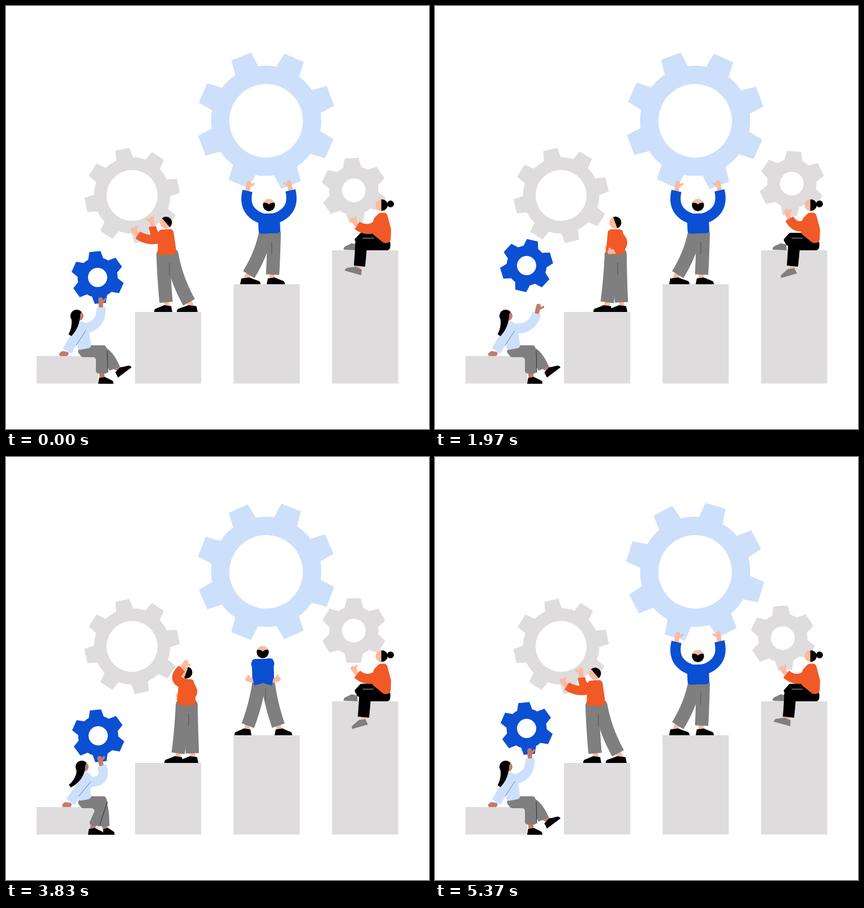
An HTML page with a canvas for the animation above (5.41 s loop, 748 by 748 pixels).

```html
<!DOCTYPE html>
<html lang="en">
<head>
<meta charset="utf-8">
<title>Gears</title>
<style>
html, body { margin: 0; width: 100%; height: 100%; overflow: hidden; background: #fff; }
canvas { display: block; }
</style>
</head>
<body>
<canvas id="stage" width="748" height="748"></canvas>
<script>
const g = document.getElementById('stage').getContext('2d');
const LOOP = 5410, TIMES = [0, 1200, 1970, 2670, 3830, 4670, 5370, LOOP];
const ORANGE = '#f15a26', BLUE = '#0b4fd3', PALE = '#cce0fc', STONE = '#dedcdc',
  GREY = '#7f7f7f', BLACK = '#000', SKIN = '#fbba9e', TAN = '#c27c6b';

// Poses of the two standing figures; feet are heel and signed length, twice.
const PUSHER = {
  push: { hip: [285, 440], chest: [283, 404], hand: [233, 405], back: [259, 390], feet: [294, -32, 339, -37], turn: -40, knee: 0 },
  stoop: { hip: [308, 440], chest: [301, 404], hand: [296, 455], back: [308, 440], feet: [313, -33, 340, -33], turn: -65, knee: 0 },
  proud: { hip: [319, 439], chest: [319, 404], hand: [318, 434], back: [314, 430], feet: [313, -33, 340, -33], turn: -20, knee: 0 },
  step: { hip: [303, 453], chest: [305, 415], hand: [274, 441], back: [325, 454], feet: [283, -32, 339, -37], turn: -5, knee: -34 },
  scratch: { hip: [319, 439], chest: [319, 402], hand: [311, 374], back: [314, 425], feet: [313, -33, 340, -33], turn: 20, knee: 0 }
};
const LIFTER = {
  hold: { hip: [466, 402], chest: [465, 376], head: [465, 352], hands: [427, 327, 503, 326], feet: [414, 36, 461, 32] },
  shift: { hip: [459, 404], chest: [458, 378], head: [460, 354], hands: [417, 335, 480, 325], feet: [414, 36, 461, 32] },
  lean: { hip: [478, 400], chest: [486, 372], head: [497, 353], hands: [511, 323, 543, 347], feet: [415, 21, 475, 31] },
  rest: { hip: [455, 395], chest: [454, 366], head: [454, 345], hands: [437, 395, 472, 395], feet: [434, -30, 475, 31] }
};
const TOSSER = {
  sit: { lean: 0, near: [169, 650], far: [192, 641], heel: 163, foot: [198, 657, 222, 639] },
  crouch: { lean: 9, near: [155, 652], far: [173, 653], heel: 145, foot: [171, 668, 192, 668] },
  perch: { lean: 5, near: [172, 650], far: [175, 649], heel: 163, foot: [173, 666, 201, 664] }
};
const cast = (poses, names) => names.split(' ').map(n => poses[n]);
const pusherKeys = cast(PUSHER, 'push stoop proud step scratch push push push');
const lifterKeys = cast(LIFTER, 'hold shift hold lean rest rest hold hold');
const tosserKeys = cast(TOSSER, 'sit sit sit sit crouch perch sit sit');

const bigTurn = [-21.3, 169.8, 294.3, 398.4, 606.1, 752.6, 872, 878.7];
const blueX = [162, 162, 162, 162, 163, 176, 162, 162];
const blueY = [480, 458, 459, 466, 493, 488, 480, 480];
const rightX = [615, 615, 631, 615, 615, 615, 615, 615];
const rightY = [326, 305, 314, 330, 307, 323, 320, 326];
const rightTurn = [-4, 5.5, 4, -3, 0, -4, -4, -4];
const legSwing = [0, .2, 1, 1, 1, 1, 0, 0];

let key = 0, part = 0;
const smooth = u => u * u * (3 - 2 * u);
function mix(a, b, u) {
  if (typeof a === 'number') return a + (b - a) * u;
  if (Array.isArray(a)) return a.map((v, i) => mix(v, b[i], u));
  return Object.fromEntries(Object.keys(a).map(k => [k, mix(a[k], b[k], u)]));
}
const linear = keys => mix(keys[key], keys[key + 1], part);
const eased = keys => mix(keys[key], keys[key + 1], smooth(part));

function disc(color, x, y, r, from = 0, to = 7) {
  g.fillStyle = color;
  g.beginPath();
  g.arc(x, y, r, from, to);
  g.fill();
}
function line(color, width, x1, y1, x2, y2) {
  g.strokeStyle = color;
  g.lineWidth = width;
  g.lineCap = 'round';
  g.beginPath();
  g.moveTo(x1, y1);
  g.lineTo(x2, y2);
  g.stroke();
}
function poly(color, p, r = 0) {
  const n = p.length;
  g.fillStyle = color;
  g.beginPath();
  g.moveTo((p[0] + p[n - 2]) / 2, (p[1] + p[n - 1]) / 2);
  for (let i = 0; i < n; i += 2) g.arcTo(p[i], p[i + 1], p[(i + 2) % n], p[(i + 3) % n], r);
  g.closePath();
  g.fill();
}
// Tapered limb from a to b, pulled towards c.
function tube(color, [ax, ay], [cx, cy], [bx, by], w, end = w) {
  const left = [], right = [];
  for (let i = 0; i <= 16; i++) {
    const t = i / 16, s = 1 - t;
    const x = s * s * ax + 2 * s * t * cx + t * t * bx;
    const y = s * s * ay + 2 * s * t * cy + t * t * by;
    const dx = s * (cx - ax) + t * (bx - cx), dy = s * (cy - ay) + t * (by - cy);
    const k = mix(w, end, t) / 2 / (Math.hypot(dx, dy) || 1);
    left.push([x - dy * k, y + dx * k]);
    right.unshift([x + dy * k, y - dx * k]);
  }
  disc(color, ax, ay, w / 2);
  g.beginPath();
  left.concat(right).forEach(q => g.lineTo(...q));
  g.fill();
}
// Elbow of an arm with two equal bones.
function elbow([ax, ay], [bx, by], bone, side) {
  const dx = bx - ax, dy = by - ay, d = Math.hypot(dx, dy);
  const k = side * Math.sqrt(Math.max(0, bone * bone - d * d / 4)) / d;
  return [(ax + bx) / 2 - dy * k, (ay + by) / 2 + dx * k];
}
function hand(color, [ex, ey], [x, y], thumb) {
  const d = Math.hypot(x - ex, y - ey), dx = (x - ex) / d * 10, dy = (y - ey) / d * 10 - 4;
  line(color, 8, x, y, x + dx, y + dy);
  line(color, 4, x + dx * .5, y + dy * .5, x + dx - dy * .6 * thumb, y + dy + dx * .6 * thumb);
}
function makeArm(from, to, bone, side) {
  const mid = elbow(from, to, bone, side);
  return {
    sleeve: (color, w, end) => tube(color, from, mid, to, w, end),
    hand: (color, thumb) => hand(color, mid, to, thumb)
  };
}
function shoe(color, [hx, hy, tx, ty], h = 12) {
  const dx = tx - hx, dy = ty - hy, k = h * (Math.sign(dx) || 1) / Math.hypot(dx, dy);
  const spot = (a, b) => [hx + dx * a + dy * k * b, hy + dy * a - dx * k * b];
  g.fillStyle = color;
  g.beginPath();
  g.moveTo(hx, hy);
  g.lineTo(...spot(.06, .85));
  g.lineTo(...spot(.45, 1));
  g.quadraticCurveTo(...spot(.65, .75), ...spot(.9, .5));
  g.quadraticCurveTo(...spot(1, .4), tx, ty);
  g.fill();
}
function ankle(color, [x, y], [hx, hy, tx, ty]) {
  line(color, 9, x, y - 3, mix(hx, tx, .27), mix(hy, ty, .27) - 8);
}

function gear(color, teeth, x, y, turn, outer, body, hole) {
  const [top, base] = teeth === 8 ? [.153, .225] : [.215, .385];
  const sin = body * Math.sin(base), cos = body * Math.cos(base);
  disc(color, x, y, body);
  for (let i = 0; i < teeth; i++) {
    g.save();
    g.translate(x, y);
    g.rotate(turn * Math.PI / 180 + i * 2 * Math.PI / teeth);
    poly(color, [-top * outer, -outer, top * outer, -outer, sin, -cos, 0, 0, -sin, -cos]);
    g.restore();
  }
  disc('#fff', x, y, hole);
}

// Trousers hang from the hip; each hem sits over its foot, drawn a little to the hip.
function legs({ hip: [x, y], feet, knee = 0 }, ground) {
  const pair = [0, 1].map(i => {
    const hx = x + (i ? 8 : -7), heel = feet[i * 2], length = feet[i * 2 + 1];
    const mid = heel + Math.max(-10, Math.min(10, length));
    const hem = [mix(mid, hx, .15), ground - 17];
    const foot = [heel, ground, heel + length, ground];
    ankle(SKIN, hem, foot);
    shoe(BLACK, foot);
    return [[hx, y], [mix(hx, hem[0], .25) + (i ? 0 : knee), (y + hem[1]) / 2], hem];
  });
  pair.forEach(leg => tube(GREY, ...leg, 24, 23.5));
  line('#444', .8, x + 4, y + 15, x + 4, y + 36);
}
// Torso along the line from hip to chest; returns a point across the chest.
function torso(color, { hip: [hx, hy], chest: [cx, cy] }, low, high, r) {
  const d = Math.hypot(cx - hx, cy - hy), ux = (cx - hx) / d, uy = (cy - hy) / d;
  const across = (x, y, w) => [x - uy * w, y + ux * w];
  const tx = cx + ux * 9, ty = cy + uy * 9;
  poly(color, [...across(tx, ty, -high), ...across(tx, ty, high),
    ...across(hx, hy, low), ...across(hx, hy, -low)], r);
  return w => across(cx, cy, w);
}

function pusher() {
  const p = eased(pusherKeys), [x, y] = p.chest, a = p.turn * Math.PI / 180;
  const front = makeArm(p.chest, p.hand, 30, -1);
  const back = makeArm([x + 4, y], p.back, 28, -1);
  legs(p, 541);
  back.hand(SKIN, -1);
  back.sleeve(ORANGE, 17, 13);
  torso(ORANGE, p, 17, 13, 6);
  disc(SKIN, x, y - 21, 10.5);
  disc(BLACK, x, y - 21, 10.5, a - 1.6, a + 1.6);
  front.hand(SKIN, 1);
  front.sleeve(ORANGE, 19, 15);
}

function lifter() {
  const p = eased(lifterKeys), [x, y] = p.head;
  legs(p, 492);
  const across = torso(BLUE, p, 19, 19, 5);
  const arms = [-1, 1].map((s, i) => makeArm(across(s * 11), p.hands.slice(i * 2, i * 2 + 2), 38, s));
  arms.forEach((arm, i) => arm.hand(SKIN, i ? -1 : 1));
  torso(BLUE, p, 19, 19, 5);
  arms.forEach(arm => arm.sleeve(BLUE, 19, 18));
  g.save();
  g.translate(x, y);
  g.rotate((x - p.chest[0]) * Math.PI / 30);
  disc(SKIN, 0, -.5, 10.5);
  g.fillStyle = BLACK;
  g.beginPath();
  g.arc(0, 0, 10.7, -.4, Math.PI + .4);
  g.quadraticCurveTo(-3, -4.5, 0, -1);
  g.quadraticCurveTo(3, -4.5, 9.9, -4.2);
  g.fill();
  g.restore();
}

// Her hand follows the gear while it is low, and waits open while it floats.
function tosser(gx, gy) {
  const { lean, near, far, heel, foot } = eased(tosserKeys), [nx, ny] = near;
  const x = 126 + lean, nearFoot = [heel, 668, heel + 27, 668];
  ankle(TAN, far, foot);
  shoe(BLACK, foot);
  tube(GREY, [165, 611], [mix(172, far[0], .35), 612], far, 20);
  ankle(TAN, near, nearFoot);
  shoe(BLACK, nearFoot);
  poly(GREY, [124, 608, 150, 600, 176, 600, 180, 612, nx + 11, ny, nx - 10, ny, 159, 621, 134, 621], 5);
  line('#222', .9, 179, 610, nx + 11, ny - 2);

  const grip = smooth(Math.max(0, Math.min(1, (gy - 466) / 14)));
  const arm = makeArm([x + 15, 570 + lean / 2], mix([180, 544], [gx + 6, gy + 53], grip), 30, 1);
  const shoulder = [x + 7, 566], elbowAt = [x - 4, 587], wrist = [108 + lean * .6, 610];
  const [wx, wy] = wrist;
  arm.hand(TAN, 1);
  poly(TAN, [wx - 9, wy, wx + 4, wy + 2, wx + 1, 619, wx - 19, 619], 3);
  poly(PALE, [x + 1, 559, x + 19, 565, 149, 590, 151, 604, 126, 609], 5);
  arm.sleeve(PALE, 18, 16);
  tube(PALE, shoulder, elbowAt, wrist, 17, 18);
  line('#5b6472', .8, x + 15, 574, 124 + lean / 2, 600);
  disc(TAN, x + 2, 548, 9);
  tube(BLACK, [x - 3, 548], [x - 2, 568], [113, 582], 16, 6);
  disc(BLACK, x - 1, 548, 11, 1.7, 5.6);
}

// Her hand dips with the gear, but never reaches above her lap.
function sitter(gx, gy) {
  const swing = eased(legSwing), pull = gx - 615;
  const hem = mix([625, 460], [632, 460], swing);
  const foot = mix([628, 476, 599, 468], [640, 473, 612, 481], swing);
  const arm = makeArm([661, 384], [621 + pull * .35, Math.max(gy + 62, 384 - pull / 2)], 26, -1);
  shoe(GREY, [622, 432, 597, 431]);
  poly(BLACK, [650, 401, 627, 401, 616, 413, 622, 424, 650, 420], 3);
  ankle(SKIN, hem, foot);
  shoe(GREY, foot);
  poly(BLACK, [hem[0] - 6, 412, 650, 400, 680, 417, 679, 432, 636, 432, hem[0] - 4, 428], 6);
  tube(BLACK, [hem[0] + 3, 420], [hem[0] + 2, 440], hem, 21, 20);
  line('#ddd', .8, 631, 410.5, 650, 410.5);
  poly(ORANGE, [660, 366, 673, 365, 681, 395, 680, 419, 668, 419, 647, 402, 650, 376], 7);
  arm.hand(SKIN, 1);
  arm.sleeve(ORANGE, 20, 16);
  disc(SKIN, 664, 352, 10.5);
  disc(BLACK, 665, 352, 10, -1.7, 1.7);
  disc(BLACK, 680, 350, 6);
}

function draw(now) {
  const t = now % LOOP;
  key = TIMES.findLastIndex(k => k <= t);
  part = (t - TIMES[key]) / (TIMES[key + 1] - TIMES[key]);
  const blue = [linear(blueX), linear(blueY)], right = [linear(rightX), linear(rightY)];
  g.fillStyle = '#fff';
  g.fillRect(0, 0, 748, 748);
  gear(PALE, 8, 460, 203, linear(bigTurn), 122, 97.5, 65);
  gear(STONE, 8, 223, 335, Math.min(45, t * .022) - 11.8, 83.5, 67.5, 45);
  gear(BLUE, 6, ...blue, Math.min(240, t * .0705) - 6, 46, 35.5, 17);
  gear(STONE, 6, ...right, linear(rightTurn), 57, 43.5, 21);
  g.fillStyle = STONE;
  [619, 541, 492, 432].forEach((top, i) => g.fillRect(54 + 174.2 * i, top, i ? 117 : 109, 667.5 - top));
  tosser(...blue);
  pusher();
  lifter();
  sitter(...right);
}

const start = performance.now();
function tick() {
  draw(performance.now() - start);
  requestAnimationFrame(tick);
}
tick();
</script>
</body>
</html>
```
